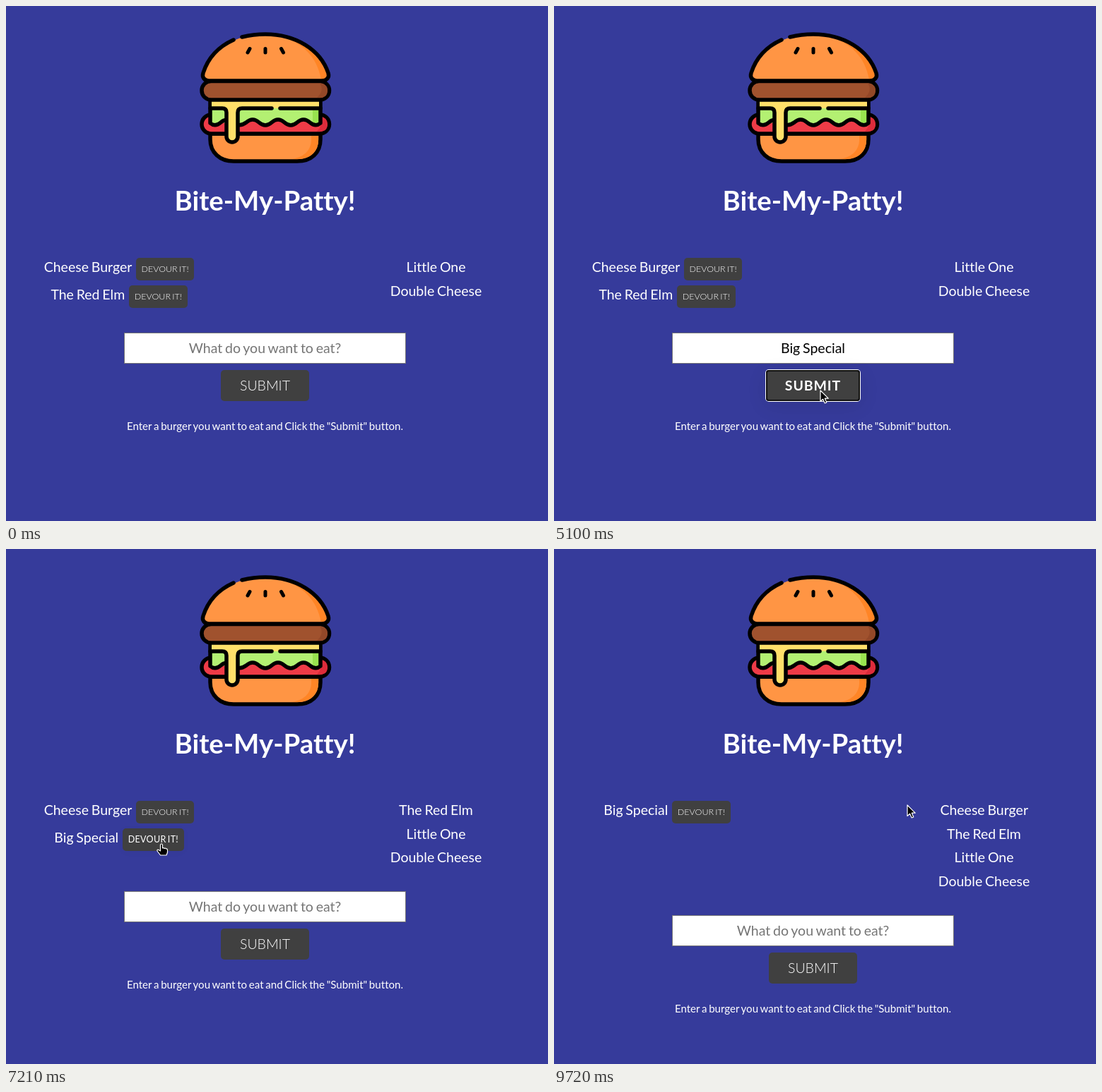
An HTML page for the animation above (9.82 s loop, 767 by 730 pixels).

```html
<!DOCTYPE html>
<html lang="en">
<head>
<meta charset="utf-8">
<title>Burger list</title>
<style>
html, body { margin: 0; width: 100%; height: 100%; overflow: hidden; background: #363b9b; }
#stage { position: relative; width: 767px; height: 730px; overflow: hidden; color: #fff;
  font: 400 19.5px Lato, sans-serif; word-spacing: -0.06em; font-variant-ligatures: none; }
#stage > * { position: absolute; }
svg { left: 0; top: 0; overflow: visible; }
h1, .note { left: 0; width: 733px; margin: 0; text-align: center; }
h1 { top: 251px; font-size: 38.4px; line-height: 48px; }
.row { width: 320px; height: 36px; line-height: 32px; text-align: center; white-space: nowrap; }
.btn { display: inline-block; border-radius: 5px; background: #404040; font-weight: 300; }
.row .btn { margin-left: 2px; padding: 0 7.7px; font-size: 12.5px; line-height: 32px; }
#form { left: 0; top: 0; width: 733px; height: 730px; }
#form > * { position: absolute; }
#field { left: 167px; top: 463px; width: 399px; height: 44px; line-height: 44px; background: #fff;
  color: #757575; text-align: center; box-shadow: inset 0 0 0 1px #767676; white-space: pre; }
#typed { position: relative; color: #000; }
#caret { position: absolute; right: -1px; top: 0; width: 1px; height: 23px; background: #000; }
.ring { position: absolute; inset: 0; border-radius: 2px;
  box-shadow: inset 0 0 0 2px #101010, 0 0 0 1px #fff; }
#submitLine { left: 0; top: 516px; width: 733px; text-align: center; }
#submit { position: relative; padding: 0 26.5px; line-height: 44px; }
#submit .ring { border-radius: 4px; }
.note { top: 583px; font-size: 15.1px; line-height: 24px; }
</style>
</head>
<body>
<div id="stage">
  <svg width="767" height="240" fill="none" stroke="#000" stroke-width="5.5" stroke-linecap="round" stroke-linejoin="round">
    <!-- lower bun -->
    <path fill="#ff9544" d="M289 181V189C289 208 303 220 322 220H412C432 220 445 208 445 189V181Z"/>
    <path fill="#ff8526" stroke="none" d="M432 184H442V190C442 206 431 217 413 217H402C421 216 432 204 432 190Z"/>
    <!-- tomato -->
    <rect fill="#ee3b47" x="277" y="154" width="180.5" height="27" rx="13.5"/>
    <path fill="#dd2c3b" stroke="none" d="M440 178Q449 168 445 157Q455 158 455 167.5Q455 178 444 178Z"/>
    <!-- lettuce -->
    <path fill="#b3f072" stroke="none" d="M289 133V166q7 6 15 -1L328 168.5q6 1 12 -3.5q9 -8 18 0t18 0t18 0t18 0t18 0q8 7 15 1V133Z"/>
    <path fill="#98e34f" stroke="none" d="M434 145H443V166L434 167Z"/>
    <path d="M289 133V166q7 6 15 -1q4 -3.500 8 -3.500M328 168.500q6 1 12 -3.500q9 -8 18 0t18 0t18 0t18 0t18 0q8 7 15 1V133"/>
    <!-- cheese -->
    <path fill="#ffe06a" stroke="none" d="M291 133H443V145H334Q328 145 328 151V185a8 8 0 0 1-16 0V151Q312 145 306 145H291Z"/>
    <path d="M289 145H306Q312 145 312 151V185a8 8 0 0 0 16 0V151Q328 145 334 145H376M388 145H445"/>
    <!-- patty -->
    <rect fill="#a0522e" x="277" y="106.500" width="180.5" height="26.500" rx="13.2"/>
    <path fill="#934828" stroke="none" d="M440 130Q451 120 444 109.500Q455 110 455 120Q455 130 444 130Z"/>
    <!-- upper bun -->
    <path fill="#ff9544" stroke="none" d="M287 106C281 106 277 101 279 95C289 62 324 40 367 40C410 40 445 62 456 95C458 101 454 106 447 106Z"/>
    <path fill="#ff8526" stroke="none" d="M385 42C420 51 440 72 446 104L453 103Q455 100 454 95C443 64 415 45 385 42Z"/>
    <path d="M334 44C344 41.500 355 40 367 40C410 40 445 62 456 95C458 101 454 106 447 106H287C281 106 277 101 279 95C286 73 302 57 322 48"/>
    <path stroke-width="5" d="M345 60.500L342 66M367 60.500V66M389.500 60.500L392.500 66"/>
  </svg>
  <h1>Bite-My-Patty!</h1>
  <div id="form">
    <div id="field"><span id="hint">What do you want to eat?</span><span id="typed"><span id="text"></span><i id="caret"></i></span><div class="ring"></div></div>
    <div id="submitLine"><span class="btn" id="submit">SUBMIT<i class="ring"></i></span></div>
    <div class="note">Enter a burger you want to eat and Click the "Submit" button.</div>
  </div>
  <svg id="pointer" width="20" height="22" stroke="#fff" stroke-width="1.2" stroke-linejoin="round">
    <path id="arrow" d="M0 0V15.500L3.600 12.200L6.200 18L8.800 16.900L6.300 11.200H11.200Z"/>
    <path id="hand" d="M-1.500 1Q0 -1 1.500 1V6Q3 5 4 6.500Q5.500 5.500 6.500 7Q8.500 6.500 8.500 9V12L7 16H-1.500L-6 10Q-6.500 7.500 -4 8.500L-1.500 10Z"/>
  </svg>
  <svg id="click" width="767" height="730" fill="none" stroke="#1d50e4" stroke-width="1.7">
    <circle cx="246" cy="369" r="9.500"/>
  </svg>
</div>
<script>
const LOOP = 9820;
const $ = id => document.getElementById(id);
const show = (el, on) => el.style.display = on ? '' : 'none';
const clamp = v => Math.max(0, Math.min(1, v));
const ease = v => v * v * (3 - 2 * v);
const between = (t, a, b) => t >= a && t < b;

const names = ['Cheese Burger', 'The Red Elm', 'Big Special', 'Little One', 'Double Cheese'];
// Each page load: start time, waiting items, devoured items, form offset
const pages = [
  { at: 0, left: [0, 1], right: [3, 4], dy: 0 },
  { at: 5140, left: [0, 1, 2], right: [3, 4], dy: 39 },
  { at: 7110, left: [0, 2], right: [1, 3, 4], dy: 22.4 },
  { at: 7730, left: [2], right: [0, 1, 3, 4], dy: 56 }
];
const keys = [1510, 1680, 2070, 2330, 2600, 2790, 2900, 3000, 3160, 3230, 3290];
const path = [
  [4220, 392, 488], [4620, 377, 545], [5730, 377, 545], [6090, 229, 418], [6720, 229, 418],
  [6900, 220, 418], [7260, 220, 418], [7500, 246, 366], [7730, 246, 366], [7890, 309, 544],
  [8010, 318, 586], [8900, 318, 586], [9720, 500, 363]
];

const rows = names.map(name => {
  const el = document.createElement('div');
  el.className = 'row';
  el.innerHTML = `<span>${name}</span> <span class="btn">DEVOUR IT!</span>`;
  $('stage').insertBefore(el, $('pointer'));
  return { el, btn: el.querySelector('.btn') };
});

// Progress of a hover that starts at `on` and fades, or is cut, at `off`
function hover(t, on, off, fade = true) {
  if (t < off) return clamp((t - on) / 300);
  return fade ? 1 - clamp((t - off) / 300) : 0;
}

function paint(btn, h) {
  btn.style.fontWeight = h < 0.25 ? 300 : h < 0.5 ? 400 : 700;
  btn.style.letterSpacing = h * 0.9 + 'px';
  btn.style.boxShadow = `0 ${6 * h}px ${28 * h}px rgba(0,0,0,${0.1 * h})`;
}

function drawRows(t, page) {
  const glow = [hover(t, 7420, 7730, false), hover(t, 6030, 7110, false), hover(t, 7110, 7340)];
  rows.forEach(({ el, btn }, i) => {
    const l = page.left.indexOf(i), r = page.right.indexOf(i);
    show(el, l >= 0 || r >= 0);
    show(btn, l >= 0);
    el.style.left = (l >= 0 ? 0 : 448.5) + 'px';
    el.style.top = 354.2 + (l >= 0 ? 39 * l : 33.5 * r) + 'px';
    paint(btn, glow[i] || 0);
  });
}

function drawForm(t, page) {
  const typed = t < 5140 ? keys.filter(k => t >= k).length : 0;
  const focused = between(t, 600, 4850);
  $('form').style.top = page.dy + 'px';
  $('text').textContent = names[2].slice(0, typed);
  show($('hint'), !typed);
  const box = $('typed').style;
  box.position = typed ? 'relative' : 'absolute';
  box.left = typed ? '' : '199px';
  box.top = typed ? '' : '11px';
  show($('caret'), between(t, 620, 1150) || between(t, 1510, 3920) || between(t, 4420, 4850));
  document.querySelector('#field .ring').style.opacity = focused ? clamp((t - 540) / 360) : 0;
  show(document.querySelector('#submit .ring'), between(t, 4850, 5140));
  paint($('submit'), t < 5140 ? hover(t, 4480, 5140, false) : hover(t, 8190, 9000));
}

function drawPointer(t) {
  show($('pointer'), t >= path[0][0]);
  const n = path.findIndex(p => p[0] > t);
  const b = path[n < 0 ? path.length - 1 : n];
  const a = n < 0 ? b : path[Math.max(0, n - 1)];
  const k = a === b ? 1 : ease((t - a[0]) / (b[0] - a[0]));
  const [x, y] = [1, 2].map(i => a[i] + (b[i] - a[i]) * k);
  $('pointer').style.transform = `translate(${x}px,${y}px)`;
  const hand = between(t, 6030, 7340) || between(t, 7420, 7750);
  show($('hand'), hand);
  show($('arrow'), !hand);
  show($('click'), between(t, 7700, 7930));
}

function frame(now) {
  const t = now % LOOP;
  const page = pages.filter(p => t >= p.at).pop();
  drawRows(t, page);
  drawForm(t, page);
  drawPointer(t);
  requestAnimationFrame(frame);
}
requestAnimationFrame(frame);
</script>
</body>
</html>
```
